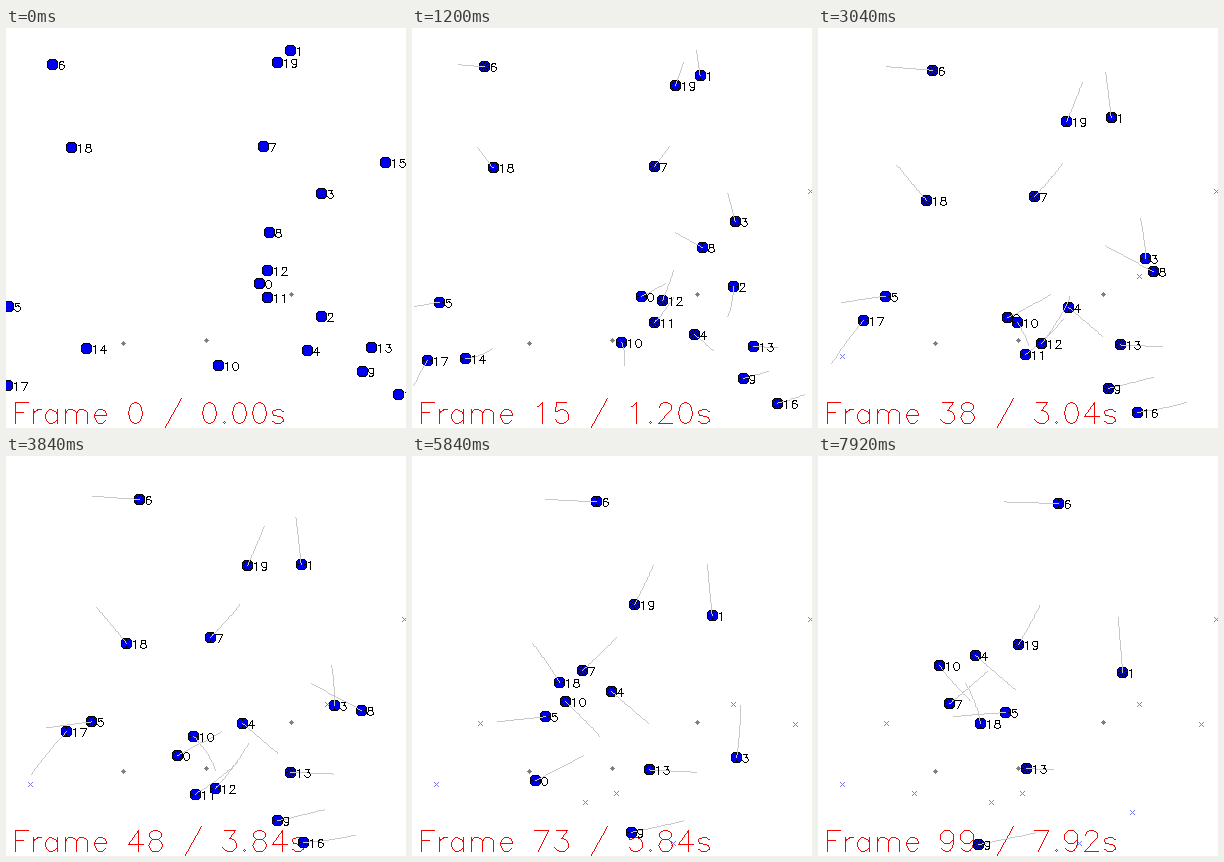
A matplotlib script that plays this animation: 400 px wide and 400 px high, repeating every 8 s.

```python
import numpy as np
import matplotlib.pyplot as plt
from matplotlib.animation import FuncAnimation
from matplotlib.collections import PolyCollection
from matplotlib.patches import Circle

SIZE, FRAMES, STEP_MS, TRAIL = 400, 100, 80, 25
GREY, PALE, CROSS, BLUE, RED = "#808080", "#c8c8c8", "#7878f0", "#0000f0", "#ff0000"
GOALS = [(117, 315), (200, 312), (285, 266)]
UNIT_SQUARE = np.array([(-0.5, -0.5), (0.5, -0.5), (0.5, 0.5), (-0.5, 0.5)])


# ---- single-stroke lettering: units above the baseline, cap height 21 ----
def arc(cx, cy, rx, ry, start, stop, n=17):
    a = np.radians(np.linspace(start, stop, n))
    return list(zip(cx + rx * np.cos(a), cy + ry * np.sin(a)))


GLYPHS = {" ": (16, [])}


def glyph(char, width, *strokes):
    GLYPHS[char] = width, [np.array(s, float) for s in strokes]


stem = [(4, 14), (4, 0)]
arch = arc(9.5, 9, 5.5, 5, 165, 0) + [(15, 0)]
six = arc(11, 11, 7, 10, 45, 180) + arc(10.5, 6.5, 6.5, 6.5, 180, 540)

glyph("0", 20, arc(10, 10.5, 7, 10.5, 0, 360))
glyph("1", 20, [(6, 17), (8, 18), (11, 21), (11, 0)])
glyph("2", 20, arc(10, 16, 6, 5, 180, -30) + [(3, 0), (17, 0)])
glyph("3", 20, [(5, 21), (16, 21), (10, 13)] + arc(10, 6.5, 7, 6.5, 70, -160))
glyph("4", 20, [(13, 0), (13, 21), (3, 7), (18, 7)])
glyph("5", 20, [(15, 21), (5, 21), (4, 12)] + arc(10, 7, 7, 7, 130, -155))
glyph("6", 20, six)
glyph("7", 20, [(3, 21), (17, 21), (7, 0)])
glyph("8", 20, arc(10, 16.5, 6, 4.5, 0, 360), arc(10, 6, 7, 6, 0, 360))
glyph("9", 20, [(20 - x, 21 - y) for x, y in six])
glyph("F", 18, [(4, 0), (4, 21), (17, 21)], [(4, 11), (12, 11)])
glyph("r", 13, stem, arc(11, 8, 7, 6, 180, 80))
glyph("a", 19, [(15, 14), (15, 0)], arc(9, 7, 6, 7, 30, 330))
glyph("m", 30, stem, arch, [(x + 11, y) for x, y in arch])
glyph("e", 18, [(3, 8), (15, 8)] + arc(9, 7, 6, 7, 15, 320))
glyph("s", 17, arc(8.5, 10.7, 5.5, 3.3, 15, 270) + arc(8.5, 3.7, 5.5, 3.7, 90, -160))
glyph("/", 22, [(20, 25), (2, -7)])
glyph(".", 10, arc(5, 1, 1, 1, 0, 360, 5))

# ---- agent paths ----
agents = []


def agent(label, *points, last=FRAMES - 1, wait=(0, 0)):
    """Smooth path through points evenly spaced in moving time; stands still during wait.

    An agent whose last frame lies inside the loop leaves a cross behind."""
    frames = np.arange(last + 1)
    moving = frames - np.clip(frames - wait[0], 0, wait[1] - wait[0])
    knots = np.linspace(0, 1, len(points))
    curve = np.polyfit(knots, np.array(points, float), len(points) - 1)
    u = moving / moving[-1]
    path = np.column_stack([np.polyval(curve[:, axis], u) for axis in (0, 1)])
    agents.append((str(label), np.rint(path), last))


agent(0, (253, 255), (180, 294), (96, 337), last=86)
agent(1, (284, 22), (295, 111), (304, 216))
agent(2, (315, 288), (320, 270), (321, 248), last=19)
agent(3, (315, 165), (327, 224), (326, 286), (314, 356), last=97, wait=(32, 36))
agent(4, (301, 322), (234, 265), (157, 199))
agent(5, (2, 278), (88, 265), (187, 256))
agent(6, (46, 36), (136, 43), (240, 47))
agent(7, (257, 118), (202, 183), (131, 247))
agent(8, (263, 204), (320, 235), (383, 268), last=61)
agent(9, (356, 343), (268, 365), (160, 388))
agent(10, (212, 337), (197, 292), (158, 250), (121, 209), wait=(15, 25))
agent(11, (261, 269), (223, 313), (173, 346), last=56)
agent(12, (261, 242), (239, 292), (204, 337), last=51)
agent(13, (365, 319), (291, 316), (208, 312), wait=(88, FRAMES))
agent(14, (80, 320), (54, 330), (24, 328), last=29)
agent(15, (379, 134), (398, 163), last=14)
agent(16, (392, 366), (331, 382), (261, 387), last=64)
agent(17, (1, 357), (29, 312), (68, 267), last=53)
agent(18, (65, 119), (102, 165), (140, 215), (162, 267))
agent(19, (271, 34), (240, 111), (200, 188))

# ---- drawing ----
fig = plt.figure(figsize=(SIZE / 100, SIZE / 100), dpi=100, facecolor="white")
ax = fig.add_axes([0, 0, 1, 1])


def pixels(stroke):
    """Whole pixels along a polyline, one per step of the longer axis."""
    pts = np.floor(np.asarray(stroke) + 0.5)
    runs = [pts[:1]]
    for a, b in zip(pts, pts[1:]):
        n = int(np.abs(b - a).max())
        runs.append(np.floor(np.linspace(a, b, n + 1) + 0.5))
    return np.concatenate(runs)


def draw_strokes(strokes, color, z):
    cells = np.unique(np.concatenate([pixels(s) for s in strokes]), axis=0)
    squares = cells[:, None, :] + UNIT_SQUARE
    ax.add_collection(PolyCollection(squares, facecolors=color, linewidths=0, zorder=z),
                      autolim=False)


def write(text, x, y, scale, color, z):
    strokes = []
    for char in text:
        width, parts = GLYPHS[char]
        strokes += [(x, y) + p * (scale, -scale) for p in parts]
        x += width * scale
    draw_strokes(strokes, color, z)


def disc(x, y, radius, color, z):
    ax.add_patch(Circle((x, y), radius, facecolor=color, linewidth=0,
                        antialiased=False, zorder=z))


def rays(x, y, inner, outer, count, turn=0.0):
    angles = turn + np.arange(count) * 2 * np.pi / count
    dirs = np.column_stack((np.cos(angles), np.sin(angles)))
    return [[(x, y) + inner * d, (x, y) + outer * d] for d in dirs]


def draw(frame):
    ax.clear()
    ax.set(xlim=(-0.5, SIZE - 0.5), ylim=(SIZE - 0.5, -0.5))
    ax.axis("off")
    for x, y in GOALS:
        draw_strokes([[(x - 2 + abs(k), y + k), (x + 2 - abs(k), y + k)]
                      for k in range(-2, 3)], GREY, 1)
    write(f"Frame {frame} / {frame * STEP_MS / 1000:.2f}s", 5, 395, 1, RED, 2)
    for z, (label, path, last) in enumerate(agents, 3):
        if last < FRAMES - 1 and frame >= last:
            draw_strokes(rays(*path[last], 0, 2.8, 4, np.pi / 4), CROSS, 1)
            continue
        x, y = path[frame]
        disc(x, y, 5.4, "black", z)
        disc(x, y, 4.4, BLUE, z + 0.1)
        if frame:
            draw_strokes(rays(x, y, 3, 5, 8), "black", z + 0.2)
            draw_strokes([path[max(0, frame - TRAIL):frame + 1]], PALE, z + 0.3)
        write(label, x + 5, y + 5, 0.4, "black", z + 0.6)
    return []


anim = FuncAnimation(fig, draw, frames=FRAMES, interval=STEP_MS, init_func=lambda: [],
                     repeat=True, repeat_delay=0)
plt.show()
```
